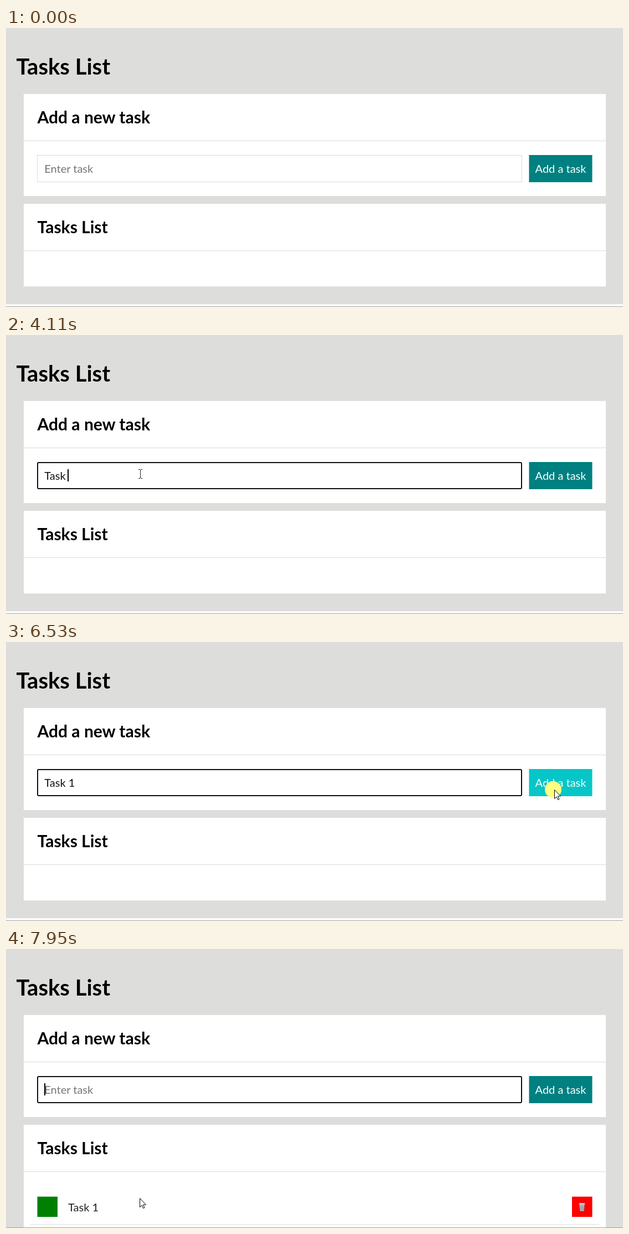
These frames come from a looping animation (1113 by 503 pixels, 8000 ms). An HTML page:

```html
<!DOCTYPE html>
<html lang="en">
<head>
<meta charset="utf-8">
<title>Tasks List</title>
<style>
  html, body { margin: 0; width: 100%; height: 100%; overflow: hidden; background: #fff; }
  svg { display: block; font: 20px Lato, sans-serif; }
  .h1 { font-size: 40px; font-weight: 700; }
  .h2 { font-size: 30px; font-weight: 700; }
  .rule { fill: #dcdcdc; }
</style>
</head>
<body>
<svg width="1113" height="503" viewBox="0 0 1113 503">
  <rect id="page" width="1113" height="498" fill="#dddddb"/>
  <text class="h1" x="18.5" y="84">Tasks List</text>

  <rect x="32" y="119" width="1050" height="184" fill="#fff"/>
  <text class="h2" x="56.5" y="172">Add a new task</text>
  <rect class="rule" x="32" y="203" width="1050" height="1"/>
  <rect id="field" fill="#fff"/>
  <text id="entry" x="69.3" y="260.5"></text>
  <rect id="caret" y="242" width="2" height="22"/>
  <rect id="button" x="943.5" y="229" width="114" height="49"/>
  <text x="1000.5" y="260.5" fill="#fff" text-anchor="middle">Add a task</text>

  <rect id="card" x="32" y="317" width="1050" height="149" fill="#fff"/>
  <text class="h2" x="56.5" y="370">Tasks List</text>
  <rect class="rule" x="32" y="401" width="1050" height="1"/>
  <g id="item">
    <rect x="56.5" y="446.5" width="36.5" height="36.5" fill="green"/>
    <text x="112" y="472.5" fill="#222">Task 1</text>
    <rect x="1021" y="446.5" width="36.5" height="36.5" fill="red"/>
    <path d="M1034.5 460.5h9l-1 12h-7z" fill="#c4c4c4" stroke="#777" stroke-width=".6"/>
    <path d="M1037 463v8M1039 463v8M1041 463v8" stroke="#777" stroke-width=".8"/>
    <rect x="1033.5" y="458" width="11" height="3" rx="1.5" fill="#ddd" stroke="#777" stroke-width=".6"/>
    <rect class="rule" x="44" y="496" width="1026" height="1"/>
  </g>
  <rect y="502" width="1113" height="1" fill="#a0a0a0"/>

  <circle id="press" r="15" fill="#ffff80"/>
  <g id="pointer">
    <path id="arrow" d="M.5 .5V16.5L4.2 13L6.7 18.5L9 17.4L6.5 12H11.5Z" fill="#fff" stroke="#000"/>
    <path id="beam" d="M-3 -7.5H-1L.5 -6.5L2 -7.5H4M.5 -6.5V7.5M-3 8.5H-1L.5 7.5L2 8.5H4" fill="none" stroke="#222"/>
  </g>
</svg>
<script>
const $ = id => document.getElementById(id);
const set = (id, attrs) => { for (const k in attrs) $(id).setAttribute(k, attrs[k]); };
const show = (id, on) => set(id, { visibility: on ? 'visible' : 'hidden' });

const LOOP = 8000, BLINK = 530, FOCUS = 1000, ADDED = 6660;
const keys = [2660, 2990, 3450, 3650, 4110, 4910];
const caretX = [69, 80, 88, 97, 107, 111, 122];
const caretResets = [930, ...keys, ADDED];

const ease = u => u * u * (3 - 2 * u);

// Eased quadratic curve through start a, control c and end b
function curve(a, c, b, u) {
  const s = ease(Math.max(0, Math.min(1, u))), r = 1 - s;
  return [0, 1].map(i => Math.round(r * r * a[i] + 2 * r * s * c[i] + s * s * b[i]));
}

function pointerAt(t) {
  const step = (start, length) => Math.floor((t - start) / length);
  const field = [242, 250], button = [989, 266];
  if (t < 5300) return curve([843, 415], [400, 178], field, step(180, 74) / 9);
  if (t < 5980) return curve(field, [640, 393], [980, 276], (step(5300, 67.5) + 1) / 10);
  if (t < 6060) return [985, 271];
  return curve(button, [620, 330], [241, 449], step(7190, 69) / 11);
}

function draw(t) {
  const focused = t >= FOCUS, added = t >= ADDED;
  const typed = added ? 0 : keys.filter(k => k <= t).length;

  set('page', { height: added ? 502 : 498 });
  set('card', { height: added ? 185 : 149 });
  show('item', added);
  set('field', focused
    ? { x: 57, y: 230, width: 873, height: 47, rx: 2, stroke: '#101014', 'stroke-width': 2 }
    : { x: 56.5, y: 229.5, width: 874, height: 48, rx: 0, stroke: '#dcdcdc', 'stroke-width': 1 });

  $('entry').textContent = typed ? 'Task 1'.slice(0, typed) : 'Enter task';
  set('entry', { fill: typed ? '#111' : '#757575' });
  const reset = caretResets.filter(k => k <= t).pop();
  set('caret', { x: caretX[typed] });
  show('caret', focused && Math.floor((t - reset) / BLINK) % 2 === 0);

  const [x, y] = pointerAt(t);
  const inRow = y >= 229 && y < 278;
  const overField = inRow && x > 56 && x < 931;
  const overButton = t >= 5980 && inRow && x > 943 && x < 1058;
  set('button', { fill: overButton ? '#06c6c8' : '#008080' });

  const visible = t >= 180;
  set('pointer', { transform: `translate(${x} ${y})` });
  show('arrow', visible && !overField);
  show('beam', visible && overField);
  set('press', { cx: x - 2, cy: y });
  show('press', t >= 920 && t < 1060 || t >= 6530 && t < ADDED);
}

const begin = performance.now();
function tick() {
  draw((performance.now() - begin) % LOOP);
  requestAnimationFrame(tick);
}
tick();
</script>
</body>
</html>
```
